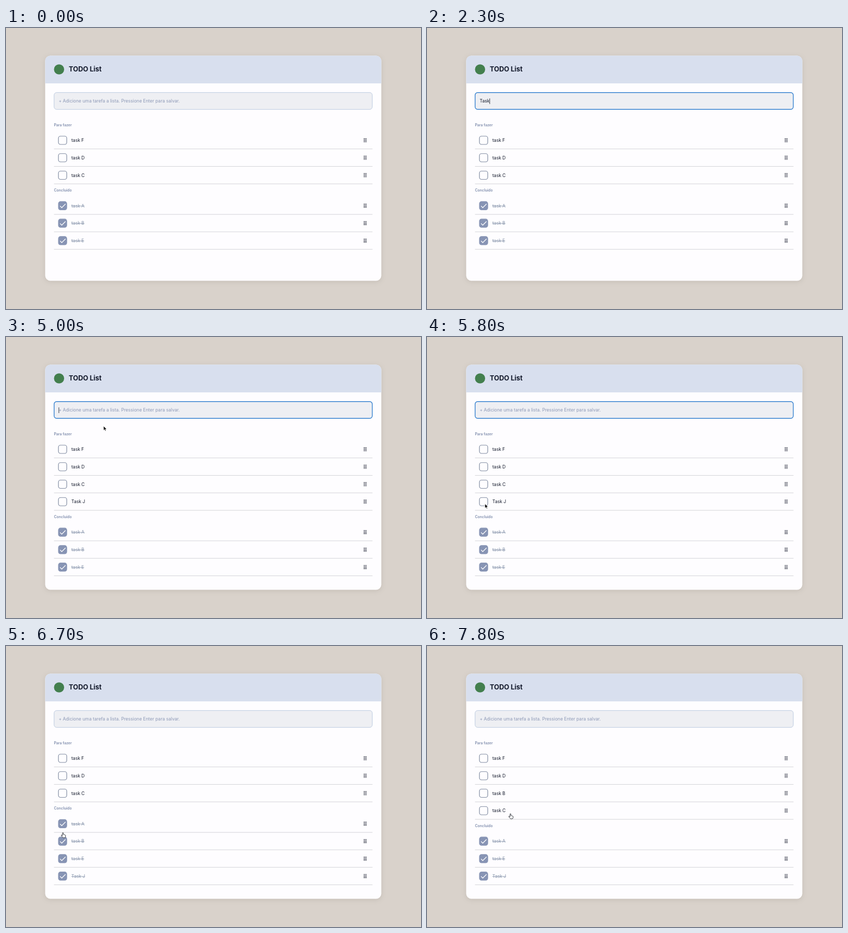
An HTML page that plays this animation: 800x543 px, repeating every 8000 ms.

```html
<!DOCTYPE html>
<html lang="pt">
<head>
<meta charset="utf-8">
<title>TODO List</title>
<style>
  html, body { margin: 0; width: 100%; height: 100%; overflow: hidden; background: #d9d2cb; }
  svg { display: block; width: 800px; height: 543px; font: 8.6px Inter, sans-serif; }
  text { white-space: pre; fill: #12182a; }
  .card { fill: #fefdff; filter: drop-shadow(0 2px 5px rgba(70, 60, 50, .13)); }
  .title { font-size: 12.9px; font-weight: 700; }
  .label { font-size: 7px; font-weight: 600; fill: #7d8bab; }
  .hint { fill: #8c98b6; }
  .done { fill: #8794ab; text-decoration: line-through; }
  .rule { stroke: #d3d3d7; }
  .box { fill: #fefdff; stroke: #7f8aa0; stroke-width: 1.2; }
  .box.on { fill: #8794b4; stroke: #8794b4; }
  .tick { fill: none; stroke: #fff; stroke-width: 1.3; }
  .dots { stroke: #3e4250; stroke-width: 1.4; stroke-dasharray: 1.4 .7; }
</style>
</head>
<body>
<svg viewBox="0 0 800 543">
  <rect class="card" x="75.5" y="53.5" width="648" height="435" rx="10"/>
  <path d="M75.5 107V63.5a10 10 0 0 1 10-10h628a10 10 0 0 1 10 10V107Z" fill="#d8dfee"/>
  <circle cx="102.3" cy="80" r="9.8" fill="#437f4e"/>
  <text class="title" x="121" y="84.2">TODO List</text>
  <g id="view"></g>
</svg>
<script>
const LOOP = 8000, STEP = 100, ROW = 33.75;
const ADDED = 3700, BLURRED = 6000, REOPENED = 7400, FOCUSED = 600;
const HINT = '+ Adicione uma tarefa a lista. Pressione Enter para salvar.';
const view = document.getElementById('view');
const pen = document.createElement('canvas').getContext('2d');
pen.font = '8.6px Inter, sans-serif';

// Typed text, by starting time
const typing = [[0, ''], [1800, 'T'], [2100, 'Tas'], [2300, 'Task'],
  [2600, 'Task '], [3000, 'Task J'], [ADDED, '']];
// Spans in which the caret shows
const caretOn = [[600, 1100], [1700, 3500], [4000, 4500], [5000, 5500]];
// Pointer: time, x, y
const path = [[200, 262, 190], [500, 196, 144], [4800, 196, 144], [5000, 188, 172],
  [5300, 146, 262], [5600, 112, 321], [5800, 111.7, 322.3], [6000, 110.5, 325],
  [6500, 110.5, 328], [6700, 110.5, 365.5], [7000, 109, 382], [7100, 109, 384],
  [7400, 109, 384], [7800, 161.7, 329]];
const pointers = {
  beam: '<path d="M-2-4.6Q0-4.6 0-3.4Q0-4.6 2-4.6M0-3.4V3.8M-2 5Q0 5 0 3.8Q0 5 2 5M-1.2 1.5H1.2" fill="none" stroke="#20242c"/>',
  arrow: '<path d="M0 0V8.5L2 6.7 3.3 9.7 4.8 9 3.5 6.2H6.2Z" stroke="#fff" stroke-width=".8"/>',
  hand: '<path d="M-1.7 1.2V-4a.9.9 0 0 1 1.8 0v2.6q1.3-.4 1.5.5 1.3-.3 1.5.6 1.2-.1 1.2.9V2.4q0 2.6-2.6 2.6H.4q-1.4 0-2.2-1.3L-4 .9q-.4-1.2.7-1.2Z" fill="#fff" stroke="#20242c" stroke-width=".9"/>'
};

const text = (x, y, str, cls = '') => `<text x="${x}" y="${y}" class="${cls}">${str}</text>`;

function row(name, y, done) {
  const dots = [690.3, 692.4, 694.5]
    .map(x => `<path class="dots" d="M${x} ${y - 3.9}v7.8"/>`).join('');
  return `<rect class="box ${done ? 'on' : ''}" x="101.1" y="${y - 8}" width="16" height="16" rx="4"/>` +
    (done ? `<path class="tick" d="M104.2 ${y + .4}l3.3 3.4 7.2-7.2"/>` : '') +
    text(126, y + 3.2, name, done ? 'done' : '') + dots +
    `<path class="rule" d="M92.5 ${y + 16.7}H706.5"/>`;
}

function section(title, names, y, done) {
  return text(92.4, y + 2.5, title, 'label') +
    names.map((name, i) => row(name, y + 30 + i * ROW, done)).join('');
}

function lists(t) {
  let open = ['task F', 'task D', 'task C'], done = ['task A', 'task B', 'task E'];
  if (t >= BLURRED) done.push('Task J');
  else if (t >= ADDED) open.push('Task J');
  if (t >= REOPENED) {
    open.splice(2, 0, 'task B');
    done.splice(1, 1);
  }
  return section('Para fazer', open, 187, false) +
    section('Concluído', done, 212.2 + open.length * ROW, true);
}

function input(t) {
  const focus = t >= FOCUSED && t < BLURRED;
  const typed = typing.findLast(([start]) => t >= start)[1];
  const x = 101.5 + pen.measureText(typed).width;
  const caret = caretOn.some(([a, b]) => t >= a && t < b);
  return `<rect x="92.7" y="124.7" width="613.4" height="32.6" rx="5" fill="#eeeff3"
    stroke="${focus ? '#3480d0' : '#bccae0'}" stroke-width="${focus ? 1.4 : 1}"/>` +
    text(101.5, 144.3, typed || HINT, typed ? '' : 'hint') +
    (caret ? `<path d="M${x + .4} 136v11" stroke="#20242c" stroke-width=".9"/>` : '');
}

function pointer(t) {
  if (t < 200 || t >= 1800 && t < 4800) return '';
  const i = path.findLastIndex(([start]) => t >= start);
  const [t0, x0, y0] = path[i], [t1, x1, y1] = path[i + 1] || [LOOP, x0, y0];
  const k = (t - t0) / (t1 - t0);
  const x = x0 + (x1 - x0) * k, y = y0 + (y1 - y0) * k;
  const kind = t >= 5900 ? 'hand' : y > 124 && y < 158 ? 'beam' : 'arrow';
  return `<g transform="translate(${x} ${y})">${pointers[kind]}</g>`;
}

let shown = -1;
function draw(now) {
  const t = Math.floor(now % LOOP / STEP) * STEP;
  if (t !== shown) view.innerHTML = input(t) + lists(t) + pointer(t);
  shown = t;
  requestAnimationFrame(draw);
}
draw(performance.now());
</script>
</body>
</html>
```
